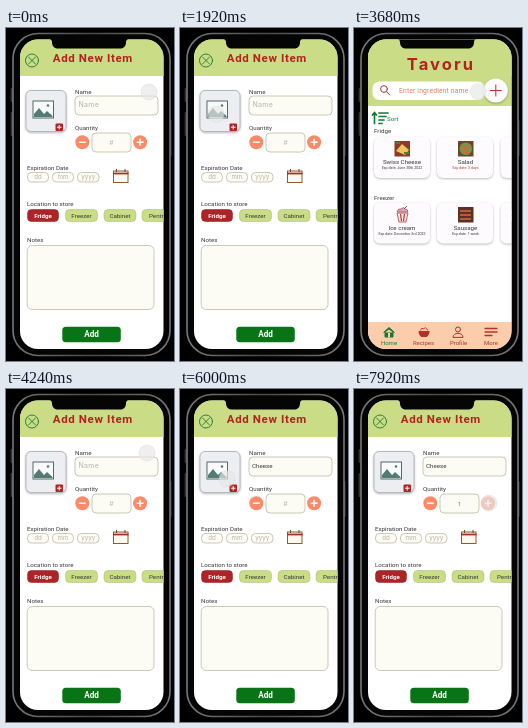
These frames come from a looping animation (168x333 px, 8 s). An HTML page:

```html
<!DOCTYPE html>
<html lang="en">
<head>
<meta charset="utf-8">
<title>Pantry app prototype</title>
<style>
html, body { margin: 0; width: 100%; height: 100%; overflow: hidden; background: #000; }
svg { display: block; width: 168px; height: 333px; }
text { font-family: Roboto, Arial, sans-serif; font-size: 6.2px; fill: #373737; }
.mid { text-anchor: middle; }
.title { font-size: 11.5px; font-weight: 700; letter-spacing: .62px; fill: #b2231f; }
.brand { font: 700 16.5px Inter, sans-serif; letter-spacing: 2.1px; fill: #b2231f; }
.search { font-size: 6.8px; letter-spacing: .15px; fill: #d9805f; }
.date { font-size: 3.6px; }
.hint { font-family: Inter, sans-serif; fill: #b4b4aa; }
.field { fill: #fcfcf4; stroke: #b4b49c; stroke-width: .7; }
.chip { fill: #c9dc86; stroke: #a9b978; stroke-width: .5; }
.on { fill: #ad2427; stroke: #861b1e; }
.card { fill: #fdfbfd; filter: drop-shadow(0 1px 1px #0004); }
.line { fill: none; stroke-linecap: round; stroke-linejoin: round; }
.green { stroke: #167a32; }
.red { stroke: #b2332b; }
.hot { fill: #3fc6f470; stroke: #38aeda; stroke-width: .6; }
.nav text { font-size: 6px; fill: #a43a2e; }

.home, .empty, .cheese, .hash, .one, .flash1, .flash2, .cursor {
  animation: 8s linear infinite;
}
.home { animation-name: home; }
.empty { animation-name: empty; }
.cheese { animation-name: cheese; }
.hash { animation-name: hash; }
.one { animation-name: one; }
.flash1 { animation-name: flash1; }
.flash2 { animation-name: flash2; }
.cursor { animation-name: move; animation-timing-function: ease-in-out; }

@keyframes home { 0%, 37.99% { visibility: hidden } 38%, 50.49% { visibility: visible } 50.5%, 100% { visibility: hidden } }
@keyframes empty { 0%, 65.49% { opacity: 1 } 65.5%, 100% { opacity: 0 } }
@keyframes cheese { 0%, 65.49% { opacity: 0 } 65.5%, 100% { opacity: 1 } }
@keyframes hash { 0%, 97.49% { opacity: 1 } 97.5%, 100% { opacity: 0 } }
@keyframes one { 0%, 97.49% { opacity: 0 } 97.5%, 100% { opacity: 1 } }
@keyframes flash1 { 0%, 15% { opacity: 0 } 16%, 18% { opacity: 1 } 21%, 100% { opacity: 0 } }
@keyframes flash2 { 0%, 83% { opacity: 0 } 84%, 86% { opacity: 1 } 89%, 100% { opacity: 0 } }
@keyframes move {
  0%, 2% { transform: translate(143px, 64px) }
  13%, 22% { transform: translate(37px, 91px) }
  32%, 39% { transform: translate(27px, 33px) }
  46% { transform: translate(124px, 63.5px) }
  48%, 53% { transform: translate(141px, 64px) }
  61%, 67% { transform: translate(90px, 78px) }
  76%, 87% { transform: translate(46px, 90px) }
  95%, 100% { transform: translate(135px, 114px) }
}
</style>
</head>
<body>
<svg viewBox="0 0 168 333">
  <defs>
    <clipPath id="screen"><rect x="14" y="11.5" width="143.5" height="309.5" rx="18"/></clipPath>
    <rect id="card" class="card" width="56" height="41" rx="6"/>
    <linearGradient id="rim" x2="1" y2="0">
      <stop stop-color="#77787a"/><stop offset=".5" stop-color="#48494b"/><stop offset="1" stop-color="#77787a"/>
    </linearGradient>
  </defs>

  <rect width="168" height="333"/>
  <rect x="4.6" y="60" width="2" height="14" rx="1" fill="#333"/>
  <rect x="4.6" y="84" width="2" height="24" rx="1" fill="#333"/>
  <rect x="163.6" y="92" width="2" height="36" rx="1" fill="#333"/>
  <rect x="7" y="5.5" width="157" height="322" rx="25" fill="#050505" stroke="url(#rim)" stroke-width="1.6"/>

  <g clip-path="url(#screen)">
    <!-- Add item form -->
    <g>
      <rect x="14" y="11" width="144" height="311" fill="#fff"/>
      <rect x="14" y="11" width="144" height="37" fill="#cbdc86"/>
      <g class="line green" stroke-width=".9">
        <circle cx="26" cy="32.5" r="6.5"/>
        <path d="M22.5 29l7 7m0-7l-7 7"/>
      </g>
      <text class="title" x="46.8" y="33.7">Add New Item</text>

      <rect x="20" y="62.5" width="40" height="41" rx="5" fill="#eceef1" stroke="#b5b8bd" style="filter:drop-shadow(0 1px 1px #0004)"/>
      <rect x="27" y="73" width="20.5" height="17" fill="#f8faf9" stroke="#54696c"/>
      <path d="M28 89v-3l5-6 5 6 3-3 5.5 5v1z" fill="#527b71"/>
      <circle cx="42" cy="77.5" r="1.3" fill="#527b71"/>
      <rect x="49.5" y="95.5" width="7.5" height="7.5" rx="1" fill="#b32126"/>
      <path d="M53.2 97v4.5M51 99.2h4.5" stroke="#fff"/>

      <text x="69" y="66">Name</text>
      <rect class="field" x="69" y="68" width="83" height="19" rx="4"/>
      <text class="hint empty" x="72.5" y="79" style="font-size:7px;letter-spacing:.3px">Name</text>
      <text class="cheese" x="72" y="79">Cheese</text>

      <text x="69" y="102">Quantity</text>
      <rect class="field" x="86" y="105" width="39" height="19" rx="4"/>
      <text class="hint mid hash" x="105.5" y="117">#</text>
      <text class="mid one" x="105.5" y="117" style="fill:#777">1</text>
      <g fill="#fb8a68"><circle cx="76.3" cy="114.3" r="7"/><circle cx="134.1" cy="114.3" r="7"/></g>
      <path d="M72.8 114.3h7M130.6 114.3h7m-3.5-3.5v7" stroke="#fff" stroke-width="1.5"/>

      <text x="21" y="142.2">Expiration Date</text>
      <rect class="field" x="21.5" y="144.5" width="21" height="9.5" rx="4"/>
      <rect class="field" x="46.5" y="144.5" width="21" height="9.5" rx="4"/>
      <rect class="field" x="71.5" y="144.5" width="21.5" height="9.5" rx="4"/>
      <text class="hint mid" x="32" y="151.3">dd</text>
      <text class="hint mid" x="57" y="151.3">mm</text>
      <text class="hint mid" x="82.2" y="150.8">yyyy</text>
      <rect x="107.5" y="143" width="14.5" height="11.5" fill="#fff8ed" stroke="#8f5a30"/>
      <path d="M107 145.5h15.5" stroke="#a72f25" stroke-width="1.8"/>
      <path d="M110.5 141v3m8.5-3v3" stroke="#7f3c22"/>

      <text x="21" y="178.3">Location to store</text>
      <rect class="chip on" x="21.5" y="181.5" width="31" height="12" rx="4"/>
      <rect class="chip" x="59.5" y="181.5" width="32" height="12" rx="4"/>
      <rect class="chip" x="98" y="181.5" width="32" height="12" rx="4"/>
      <rect class="chip" x="136" y="181.5" width="32" height="12" rx="4"/>
      <text class="mid" x="37" y="189.7" style="fill:#fff;font-weight:700">Fridge</text>
      <text class="mid" x="75.5" y="189.7">Freezer</text>
      <text class="mid" x="114" y="189.7">Cabinet</text>
      <text x="143" y="189.7">Pentry</text>

      <text x="21" y="214.2">Notes</text>
      <rect class="field" x="21.2" y="217.5" width="126.8" height="64" rx="5"/>
      <rect x="56.3" y="298.7" width="58.5" height="15.5" rx="3.5" fill="#087416"/>
      <text class="mid" x="85.5" y="309.3" style="fill:#fff;font-size:8.2px;font-weight:700">Add</text>

      <g class="flash1">
        <rect class="hot" x="69" y="61.5" width="83" height="25.5"/>
        <rect class="hot" x="19.5" y="25.5" width="13.5" height="14"/>
      </g>
      <g class="flash2">
        <rect class="hot" x="19.5" y="25.5" width="13.5" height="14"/>
        <rect class="hot" x="127" y="107.5" width="14.5" height="14"/>
      </g>
    </g>

    <!-- Home screen -->
    <g class="home">
      <rect x="14" y="11" width="144" height="311" fill="#fff"/>
      <rect x="14" y="11" width="144" height="67" fill="#cbdc86"/>
      <text class="brand mid" x="87" y="41.8">Tavoru</text>
      <rect x="18.5" y="53.5" width="112" height="18.5" rx="7" fill="#fff"/>
      <g class="line red"><circle cx="30" cy="61" r="3.4"/><path d="M32.6 63.7l3.2 3.3"/></g>
      <text class="search" x="45" y="65">Enter ingredient name</text>
      <circle class="card" cx="141.8" cy="62.5" r="12"/>
      <path class="line red" d="M136.3 62.5h11m-5.5-5.5v11"/>

      <path class="line green" d="M20.5 95.5v-11m-2 2.5l2-2.5 2 2.5M25 85h9M25 88.5h7M25 92h5M25 95.5h3" stroke-width="1.7"/>
      <text x="33" y="93.3" style="fill:#167a32">Sort</text>

      <text x="20" y="105">Fridge</text>
      <use href="#card" x="20" y="109"/><use href="#card" x="83" y="109"/><use href="#card" x="146.5" y="109"/>
      <rect x="40.5" y="113" width="15.5" height="15.5" fill="#8c3b25"/>
      <path d="M42 123l6-7 7 6-4 5z" fill="#eac45f"/>
      <path d="M42 115h4m4 10h5" stroke="#557a34" stroke-width="2"/>
      <rect x="104" y="113" width="15.5" height="15.5" fill="#68472c"/>
      <circle cx="111.8" cy="120.8" r="6.3" fill="#709747"/>
      <path d="M107 119l4 3 4-5m-5 8h5" stroke="#dc6439" stroke-width="2.2" fill="none"/>
      <text class="mid" x="48" y="135.7">Swiss Cheese</text>
      <text class="mid date" x="48" y="141.2">Exp.date: June 30th 2022</text>
      <text class="mid" x="111.5" y="135.7">Salad</text>
      <text class="mid date" x="111.5" y="141.2" style="fill:#c3342d">Exp.date: 3 days</text>

      <text x="20" y="172.3">Freezer</text>
      <use href="#card" x="20" y="174.5"/><use href="#card" x="83" y="174.5"/><use href="#card" x="146.5" y="174.5"/>
      <path d="M43 185h11l-2 9h-7z" fill="#f6e9e4" stroke="#b9363b" stroke-width=".8"/>
      <path d="M46.5 186l1 7m3-7l-1 7" stroke="#b9363b" stroke-width="1.2"/>
      <path d="M43 184q1-4 4-3 3-3 4 0 3 0 3 3z" fill="#e0a8b2" stroke="#75454e" stroke-width=".6"/>
      <path d="M50 181l3-3" stroke="#75454e"/>
      <rect x="104" y="179" width="15.5" height="15.5" fill="#553427"/>
      <path d="M106 183h11m-11 4h11m-11 4h11" stroke="#bf5837" stroke-width="2.2"/>
      <text class="mid" x="48" y="202">Ice cream</text>
      <text class="mid date" x="48" y="206.7">Exp.date: December 3rd 2023</text>
      <text class="mid" x="111.5" y="202">Sausage</text>
      <text class="mid date" x="111.5" y="206.7">Exp.date: 1 week</text>

      <rect x="14" y="294" width="144" height="28" fill="#fccdaa"/>
      <path class="green" d="M29.5 304.5l5.5-5 5.5 5M31 304v5h8v-5l-4-3z" fill="#167a32"/>
      <path d="M34 305h2v4.5h-2z" fill="#fccdaa"/>
      <path d="M64.5 303h11q0 4-3 6h-5q-3-2-3-6z" fill="#b2332b"/>
      <path class="line red" d="M66.5 302q1-3 3-1 2-3 4 1"/>
      <g class="line red"><circle cx="104" cy="301.5" r="2.5"/><path d="M99 309c0-5 10-5 10 0z"/></g>
      <path class="line red" d="M131 300.5h12m-12 3.5h12m-12 3.5h7" stroke-width="1.3"/>
      <g class="mid nav">
        <text x="35" y="317" style="fill:#167a32">Home</text>
        <text x="69.5" y="317">Recipes</text>
        <text x="104.5" y="317">Profile</text>
        <text x="137" y="317">More</text>
      </g>
    </g>

    <path d="M44 11h78q-2 1-2 3c0 4-2 6.5-6 6.5H52c-4 0-6-2.5-6-6.5q0-2-2-3z" fill="#050505"/>
    <circle class="cursor" r="8" fill="#e8e8e8" fill-opacity=".68" stroke="#ccc" stroke-opacity=".5" stroke-width=".6"/>
  </g>
</svg>
</body>
</html>
```
